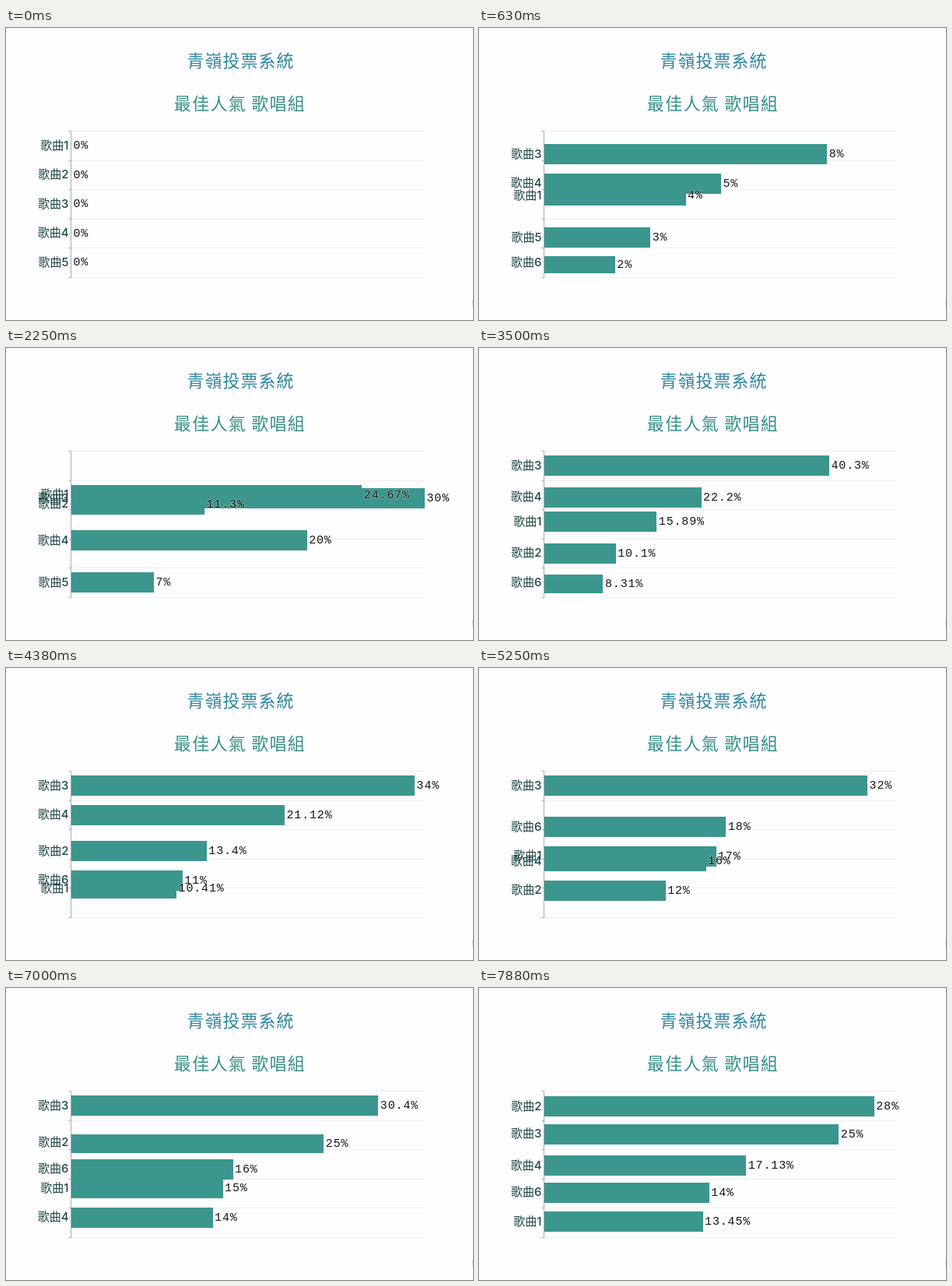
Write an HTML page with a canvas that moves like this. It is 600x375 px and loops after 8000 ms.

```html
<!DOCTYPE html>
<html lang="zh-Hant">
<head>
<meta charset="utf-8">
<title>投票系統</title>
<style>
  html, body { margin: 0; width: 100%; height: 100%; overflow: hidden; background: #fefdff; }
  canvas { display: block; }
</style>
</head>
<body>
<canvas id="stage" width="600" height="375"></canvas>
<script>
const ctx = document.getElementById('stage').getContext('2d');

const LOOP = 8000, TICK = 125, MOVE = 500;
const LEFT = 83.5, WIDTH = 454, TOP = 132.5, ROW = 37.5, ROWS = 5, BAR = 26;
const BOTTOM = TOP + ROW * ROWS;
const CJK = '"Noto Sans CJK TC", "Noto Sans CJK", sans-serif';

// Ranking and axis follow from the counts: start time, then percent per song.
const steps = [
  poll(0, '0 0 0 0 0'),
  poll(250, '4 - 8 5 3 2'),
  poll(1165, '10.45 20.1 10 10 5'),
  poll(2019, '24.67 11.3 30 20 7'),
  poll(3089, '15.89 10.1 40.3 22.2 - 8.31'),
  poll(4038, '10.41 13.4 34 21.12 - 11'),
  poll(4900, '17 12 32 16 - 18'),
  poll(5753, '20.12 - 30.4 17 16 11'),
  poll(6595, '15 25 30.4 14 - 16'),
  poll(7430, '13.45 28 25 17.13 - 14')
];

function poll(at, counts) {
  const votes = counts.split(' ')
    .map((n, i) => ({ song: i + 1, value: Number(n) }))
    .filter(v => !Number.isNaN(v.value))
    .sort((a, b) => b.value - a.value);
  const best = votes[0].value, unit = best > 35 ? 10 : 5;
  return { at, votes, max: Math.max(unit, Math.ceil(best / unit) * unit) };
}

const mix = (a, b, p) => a + (b - a) * p;
const easeSine = u => (1 - Math.cos(Math.PI * Math.min(1, Math.max(0, u)))) / 2;
const rowY = i => TOP + ROW * (i + 0.5);

function layout(time) {
  const now = steps.findLastIndex(s => s.at <= time);
  const step = steps[now];
  const before = steps[Math.max(0, now - 1)].votes.map(v => v.song);
  const p = easeSine((time - step.at) / MOVE);
  return step.votes.map(({ song, value }, i) => {
    const old = before.indexOf(song);
    const isNew = old < 0;
    const y = mix(rowY(isNew ? ROWS - 1 : old), rowY(i), p);
    // A newcomer unfolds from the bottom edge of the plot.
    return {
      song, value,
      nameY: y,
      mid: isNew ? mix(BOTTOM, rowY(i), p) : y,
      height: isNew ? BAR * p : BAR,
      length: value / step.max * WIDTH
    };
  });
}

function text(str, x, y, font, color, align = 'left', spacing = 0, halo = false) {
  ctx.font = font;
  ctx.textAlign = align;
  ctx.textBaseline = 'middle';
  ctx.letterSpacing = spacing + 'px';
  if (halo) {
    ctx.setLineDash([]);
    ctx.lineJoin = 'round';
    ctx.lineWidth = 2;
    ctx.strokeStyle = 'rgba(255,255,255,0.3)';
    ctx.strokeText(str, x, y);
  }
  ctx.fillStyle = color;
  ctx.fillText(str, x, y);
}

function line(x1, y1, x2, y2, color, dash = []) {
  ctx.setLineDash(dash);
  ctx.strokeStyle = color;
  ctx.lineWidth = 1;
  ctx.beginPath();
  ctx.moveTo(x1, y1);
  ctx.lineTo(x2, y2);
  ctx.stroke();
}

function drawGrid() {
  for (let i = 0; i <= ROWS; i++) {
    const y = Math.floor(TOP + ROW * i) + 0.5;
    line(LEFT, y, LEFT + WIDTH, y, '#dedee1', [1, 1]);
    line(LEFT - 3, y, LEFT, y, '#a5acac');
  }
}

function drawBar(b) {
  const top = Math.round(b.mid - b.height / 2);
  const bottom = Math.round(b.mid + b.height / 2);
  ctx.fillStyle = '#3b968d';
  ctx.fillRect(LEFT, top, Math.round(b.length) + 0.5, bottom - top);
}

function draw(time) {
  ctx.fillStyle = '#fefdff';
  ctx.fillRect(0, 0, 600, 375);
  text('青嶺投票系統', 301.5, 42, '300 22px ' + CJK, '#2f86a0', 'center', 1);
  text('最佳人氣 歌唱組', 300.5, 97, '300 22px ' + CJK, '#349087', 'center', 1.3);
  drawGrid();

  const bars = layout(time);
  bars.forEach(drawBar);
  line(LEFT, TOP, LEFT, BOTTOM + 0.5, '#a5acac');

  for (const b of bars) {
    text('歌曲' + b.song, 80.5, b.nameY, '500 15px Inter, ' + CJK, '#1d4747', 'right');
    text(b.value + '%', LEFT + b.length + 3, b.mid, '15px "Liberation Mono", monospace',
      '#151515', 'left', 0.85, true);
  }
  line(599.5, 349, 599.5, 357, '#d5d5d8');
}

const start = performance.now();
function frame() {
  const t = (performance.now() - start) % LOOP;
  draw(Math.floor(t / TICK) * TICK);
  requestAnimationFrame(frame);
}
frame();
</script>
</body>
</html>
```
